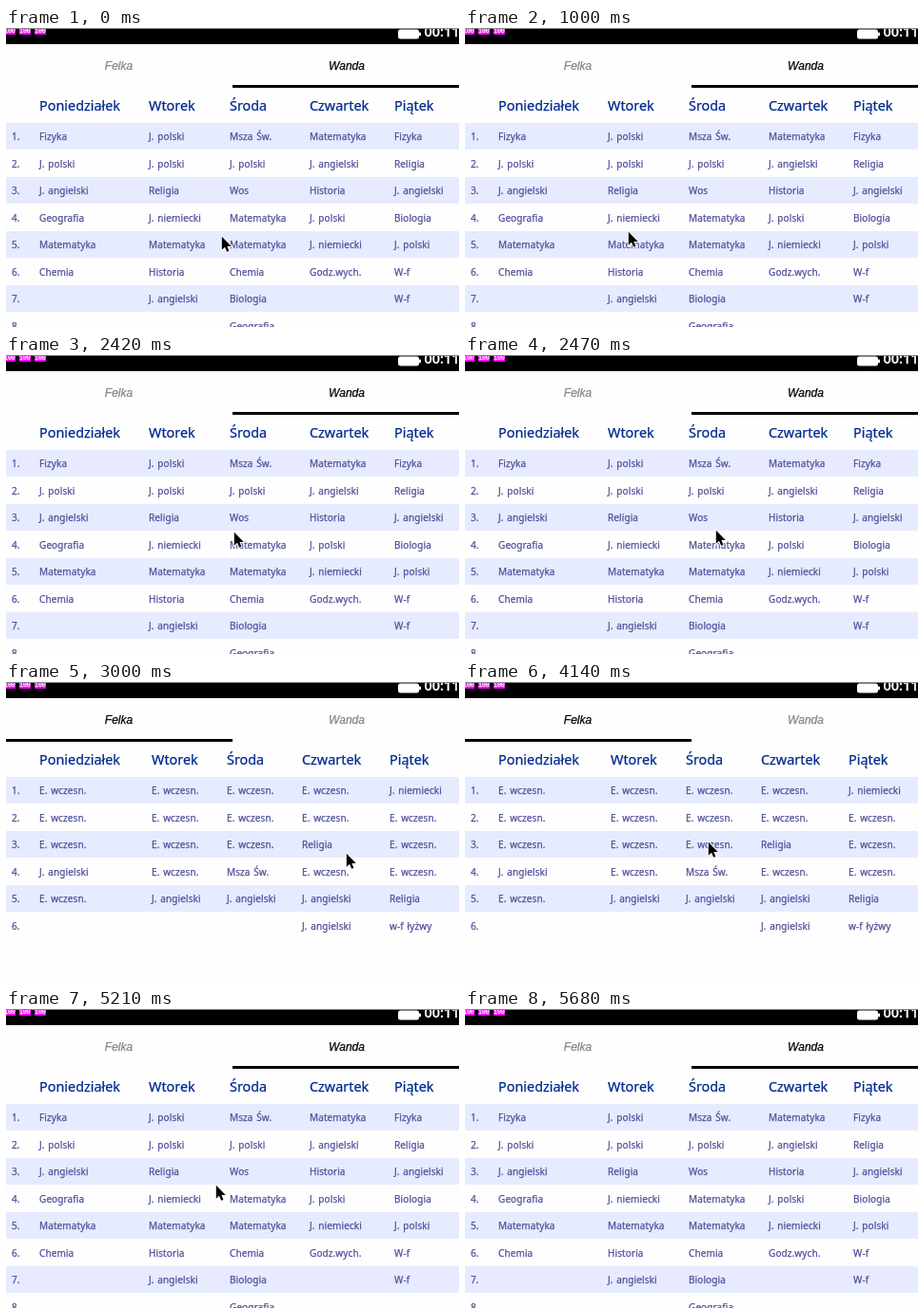
These frames come from a looping animation (476 px wide and 315 px high, 6190 ms). An HTML page with a canvas:

```html
<!DOCTYPE html>
<html lang="pl">
<head>
<meta charset="utf-8">
<style>
  html, body { margin: 0; width: 100%; height: 100%; overflow: hidden; background: #fff; }
  canvas { display: block; }
</style>
</head>
<body>
<canvas id="stage" width="476" height="315"></canvas>
<script>
const ctx = document.getElementById('stage').getContext('2d');
const LOOP = 6190, START = 582, TICK = 59;
const SWAP = 33, SWAP_BACK = 62, BUSY_TICKS = 7;
const SANS = '"Noto Sans", sans-serif';
const INK = '#50509a', HEAD = '#002a8e';

const days = ['Poniedziałek', 'Wtorek', 'Środa', 'Czwartek', 'Piątek'];
const tabs = [
  {
    name: 'Felka', centre: 118.5,
    columns: [35, 153, 232, 311, 403],
    rows: [
      'E. wczesn.|E. wczesn.|E. wczesn.|E. wczesn.|J. niemiecki',
      'E. wczesn.|E. wczesn.|E. wczesn.|E. wczesn.|E. wczesn.',
      'E. wczesn.|E. wczesn.|E. wczesn.|Religia|E. wczesn.',
      'J. angielski|E. wczesn.|Msza Św.|E. wczesn.|E. wczesn.',
      'E. wczesn.|J. angielski|J. angielski|J. angielski|Religia',
      '|||J. angielski|w-f łyżwy'
    ]
  },
  {
    name: 'Wanda', centre: 358,
    columns: [35, 150, 235, 319, 408],
    rows: [
      'Fizyka|J. polski|Msza Św.|Matematyka|Fizyka',
      'J. polski|J. polski|J. polski|J. angielski|Religia',
      'J. angielski|Religia|Wos|Historia|J. angielski',
      'Geografia|J. niemiecki|Matematyka|J. polski|Biologia',
      'Matematyka|Matematyka|Matematyka|J. niemiecki|J. polski',
      'Chemia|Historia|Chemia|Godz.wych.|W-f',
      '|J. angielski|Biologia||W-f',
      '||Geografia||'
    ]
  }
];

// Pointer stops; it eases from each one to the next.
const stops = [
  { tick: -1, x: 226, y: 219 }, { tick: 8, x: 169, y: 214 },
  { tick: 20, x: 146, y: 191 }, { tick: 25, x: 145, y: 190 },
  { tick: 38, x: 357, y: 180 }, { tick: 54, x: 357, y: 180 },
  { tick: 65, x: 177, y: 159 }, { tick: 75, x: 177, y: 159 },
  { tick: 87, x: 450, y: 325 }
];
const arrow = new Path2D('M.8 .8V14.8L4 11.8 6.2 16.8 8.4 15.9 6.4 11H10.8Z');

const ease = t => t * t * (3 - 2 * t);

function pointerAt(tick) {
  const next = stops.findIndex(s => s.tick > tick);
  if (next < 0) return stops[stops.length - 1];
  if (next === 0) return stops[0];
  const a = stops[next - 1], b = stops[next];
  const k = ease((tick - a.tick) / (b.tick - a.tick));
  return { x: Math.round(a.x + (b.x - a.x) * k), y: Math.round(a.y + (b.y - a.y) * k) };
}

function box(x, y, w, h, color) {
  ctx.fillStyle = color;
  ctx.fillRect(x, y, w, h);
}

// The hairline stroke gives the slightly heavy look of smoothed screen text.
function text(str, x, y, font, color, align = 'left') {
  ctx.font = font;
  ctx.fillStyle = ctx.strokeStyle = color;
  ctx.textAlign = align;
  ctx.lineWidth = 0.25;
  ctx.fillText(str, x, y);
  ctx.strokeText(str, x, y);
}

function drawStatusBar(busy) {
  box(0, 0, 476, 17, '#000');
  [-2, 14, 30].forEach((x, i) => {
    box(x, 0, 12, 7, '#f0f');
    text(busy && i < 2 ? '050' : '100', x, 4.5, '6.5px "Liberation Mono", monospace', '#fff');
  });
  ctx.fillStyle = '#fff';
  ctx.beginPath();
  ctx.roundRect(412, 1.5, 22, 10, 2.5);
  ctx.roundRect(434, 4.5, 2, 4, 1);
  ctx.fill();
  text('00:11', 439.5, 9, '600 14.5px "Open Sans", sans-serif', '#fff');
  box(0, 0, 476, 1, '#888');
}

function drawTabs(active) {
  tabs.forEach((tab, i) => text(tab.name, tab.centre, 44,
    'italic 12px "Liberation Sans", sans-serif', i === active ? '#000' : '#858585', 'center'));
  box(active * 238, 60, 238, 3, '#000');
}

function drawTable({ columns, rows }) {
  columns.forEach((x, c) => text(days[c], x, 87, '14.4px ' + SANS, HEAD));
  ctx.letterSpacing = '0.1px';
  ctx.wordSpacing = '1px';
  rows.forEach((row, r) => {
    const y = 100 + r * 28.5, base = Math.round(y + 18);
    if (r % 2 === 0) box(0, y, 476, 28, '#e6ebff');
    text(r + 1 + '.', 6, base, '10px ' + SANS, INK);
    row.split('|').forEach((cell, c) => text(cell, columns[c], base, '10px ' + SANS, INK));
  });
  ctx.letterSpacing = ctx.wordSpacing = '0px';
}

function drawPointer({ x, y }) {
  ctx.save();
  ctx.translate(x, y);
  ctx.strokeStyle = '#fff';
  ctx.lineWidth = 1.8;
  ctx.stroke(arrow);
  ctx.fillStyle = '#000';
  ctx.fill(arrow);
  ctx.restore();
}

function draw(time) {
  const tick = Math.floor((time % LOOP - START) / TICK);
  const active = tick >= SWAP && tick < SWAP_BACK ? 0 : 1;
  const busy = [SWAP, SWAP_BACK].some(s => tick >= s && tick < s + BUSY_TICKS);

  box(0, 0, 476, 315, '#fefefe');
  drawStatusBar(busy);
  drawTabs(active);
  drawTable(tabs[active]);
  drawPointer(pointerAt(tick));
}

const begin = performance.now();
function loop() {
  draw(performance.now() - begin);
  requestAnimationFrame(loop);
}
loop();
</script>
</body>
</html>
```
